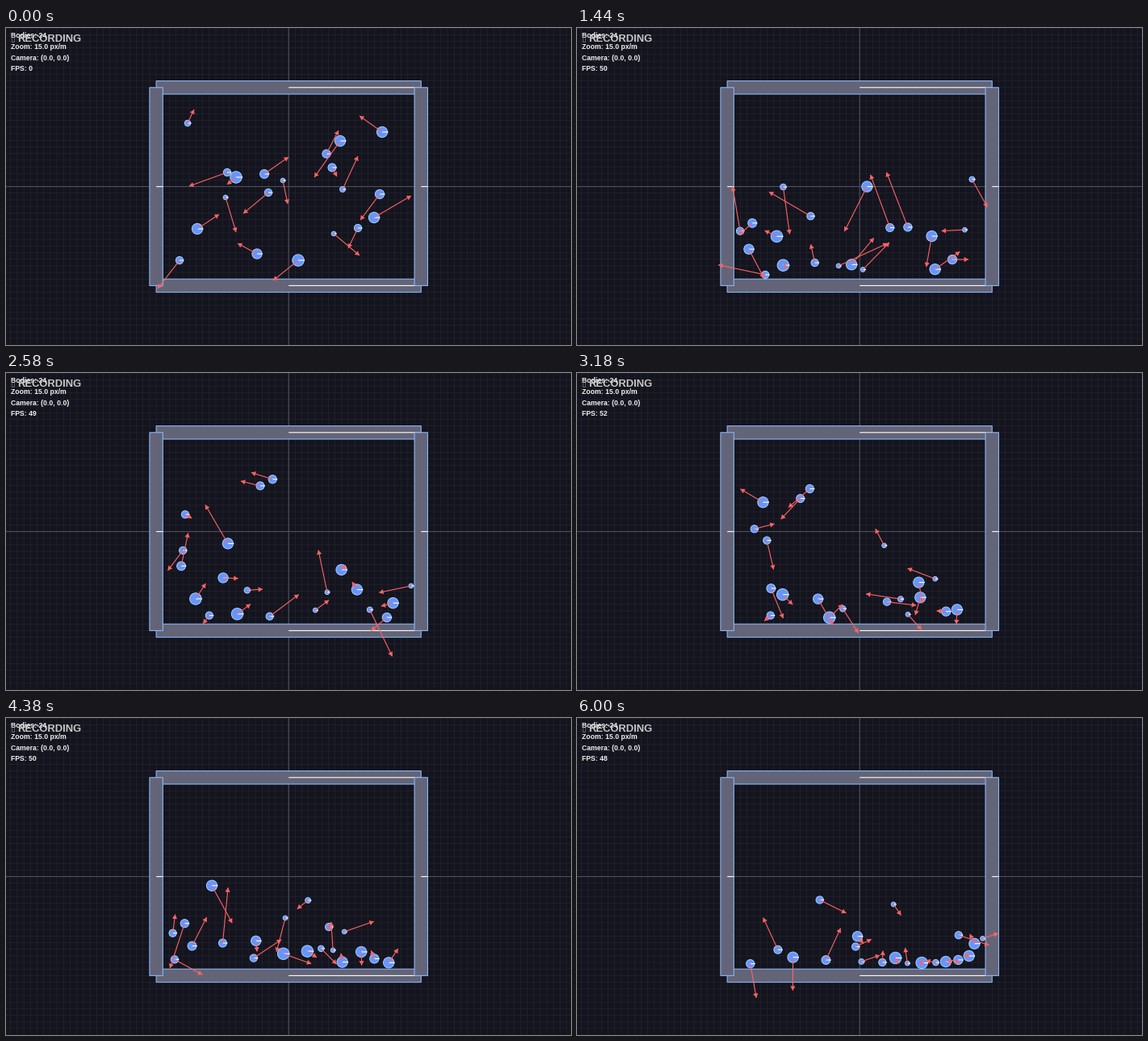
A matplotlib script for the animation above (6.06 s loop, 700x393 px).

```python
import math
import random

import matplotlib.pyplot as plt
import numpy as np
from matplotlib.animation import FuncAnimation
from matplotlib.collections import LineCollection, PolyCollection
from matplotlib.patches import Circle, Rectangle

W, H = 700, 393
FRAMES, STEP = 101, 60
CX, CY = 350.2, 196.6
MX, MY = 15 * W / 1280, 15 * H / 720   # one metre at 15 px/m, 1280 x 720 view
HALF_W, HALF_H = 20 * MX, 15 * MY
LOW = np.array([CX - HALF_W + MX, CY - HALF_H + MY])
HIGH = np.array([CX + HALF_W - MX, CY + HALF_H - MY])

GRAVITY = 138.7                # px / s^2
ARROW = 0.378                  # arrow length in px per px/s
WALL_BOUNCE, BALL_BOUNCE = 0.9, 0.8
SUBSTEPS = 12

BG, GRID, AXIS = "#14141e", "#28283200", "#50505f"
GRID = "#282833"
WALL, EDGE, BALL = "#646478", "#87b9f5", "#6496ff"
RIM, RED, WHITE = "#a5cdff", "#ff6464", "#ffffff"

# Start of each ball: centre, radius, velocity arrow.
START = np.array([
    (225, 118, 4.1, 8, -17), (466, 129, 7.0, -28, -20),
    (414, 140, 7.0, -32, 45), (397, 156, 5.5, 15, -29),
    (404, 173, 5.4, 6, 11), (274, 179, 5.0, -47, 17),
    (285, 185, 7.6, -11, 9), (320, 181, 5.8, 30, -21),
    (343, 189, 3.2, 6, 29), (325, 204, 5.0, -31, 26),
    (272, 210, 3.2, 13, 43), (417, 200, 3.8, 19, -41),
    (463, 206, 6.0, -24, 32), (456, 235, 7.0, 46, -27),
    (436, 248, 5.0, -12, 25), (406, 255, 3.2, 32, 27),
    (237, 249, 7.0, 27, -18), (215, 288, 5.0, -27, 35),
    (311, 280, 6.5, -24, -13), (362, 288, 7.6, -31, 25)])
RADII = START[:, 2]
MASS = RADII ** 2
PAIRS = np.triu_indices(len(RADII), 1)


def collide(p, v):
    i, j = PAIRS
    gap = p[j] - p[i]
    dist = np.hypot(gap[:, 0], gap[:, 1])
    depth = RADII[i] + RADII[j] - dist
    for n in np.nonzero(depth > 0)[0]:
        a, b = i[n], j[n]
        normal = gap[n] / max(dist[n], 1e-6)
        total = MASS[a] + MASS[b]
        p[a] -= normal * depth[n] * MASS[b] / total
        p[b] += normal * depth[n] * MASS[a] / total
        speed = (v[b] - v[a]) @ normal
        if speed < 0:
            kick = (1 + BALL_BOUNCE) * speed / total * normal
            v[a] += kick * MASS[b]
            v[b] -= kick * MASS[a]


def simulate():
    """Centres and velocities of all balls for every frame of the loop."""
    p, v = START[:, :2].copy(), START[:, 3:] / ARROW
    low, high = LOW + RADII[:, None], HIGH - RADII[:, None]
    dt = STEP / 1000 / SUBSTEPS
    track = []
    for _ in range(FRAMES):
        track.append((p.copy(), v.copy()))
        for _ in range(SUBSTEPS):
            p += v * dt
            p[:, 1] += GRAVITY * dt * dt / 2
            v[:, 1] += GRAVITY * dt
            collide(p, v)
            hit = ((p < low) & (v < 0)) | ((p > high) & (v > 0))
            v[hit] *= -WALL_BOUNCE
            p = np.clip(p, low, high)
    return track


track = simulate()
rng = random.Random(4)
fps = [0 if k < 3 else rng.randint(48, 53) for k in range(FRAMES)]


def px(n):
    return n * 0.72


fig = plt.figure(figsize=(W / 100, H / 100), dpi=100, facecolor=BG)
ax = fig.add_axes([0, 0, 1, 1])
ax.set_xlim(0, W)
ax.set_ylim(H, 0)
ax.axis("off")


def line(x0, y0, x1, y1, color, width, z):
    ax.plot([x0, x1], [y0, y1], color=color, lw=px(width), zorder=z,
            solid_capstyle="butt", snap=False)


def label(x, y, text, size, color, z):
    return ax.text(x, y, text, fontsize=px(size), color=color, zorder=z,
                   family="Liberation Sans", weight="bold", va="baseline")


for n in range(-43, 44):
    line(CX + n * MX, 0, CX + n * MX, H, GRID, 0.55, 1)
    if abs(n) < 25:
        line(0, CY + n * MY, W, CY + n * MY, GRID, 0.55, 1)
line(CX, 0, CX, H, AXIS, 1.1, 2)
line(0, CY, W, CY, AXIS, 1.1, 2)


def wall(x, y, half_w, half_h, z):
    ax.add_patch(Rectangle((x - half_w, y - half_h), 2 * half_w, 2 * half_h,
                           fc=WALL, ec=EDGE, lw=px(1.1), zorder=z,
                           snap=False))
    line(x, y, x + half_w, y, WHITE, 1.1, z + 0.1)


for side in (1, -1):
    wall(CX, CY + side * HALF_H, HALF_W, MY, 3)
    wall(CX + side * HALF_W, CY, MX, HALF_H, 4)

balls, marks = [], []
for n, r in enumerate(RADII):
    z = 5 + n * 0.02
    balls.append(ax.add_patch(Circle((0, 0), r - 0.4, fc=BALL, ec=RIM,
                                     lw=px(1), zorder=z)))
    marks += ax.plot([], [], color=WHITE, lw=px(1.1), zorder=z + 0.01,
                     solid_capstyle="butt", snap=False)

shafts = ax.add_collection(
    LineCollection([], colors=RED, linewidths=px(1.1), zorder=7))
heads = ax.add_collection(
    PolyCollection([], facecolors=RED, edgecolors="none", zorder=7))

for n, text in enumerate(["Bodies: 24", "Zoom: 15.0 px/m",
                          "Camera: (0.0, 0.0)", "FPS: 0"]):
    fps_text = label(6, 12.5 + n * 25 * H / 720, text, 8.7, "#f0f0f0", 8)
label(14.6, 16.6, "RECORDING", 13, "#c8c8c8", 9)
ax.add_patch(Rectangle((6.8, 8.5), 3.6, 8.2, fill=False, ec="#8c8c90",
                       lw=px(0.6), zorder=9))


def head(tip, angle, size=6.2, spread=math.pi / 6):
    return [tip] + [(tip[0] - size * math.cos(angle + d),
                     tip[1] - size * math.sin(angle + d))
                    for d in (-spread, spread)]


def draw(k):
    centres, speeds = track[k]
    tips = centres + speeds * ARROW
    for ball, mark, (x, y), r in zip(balls, marks, centres, RADII):
        ball.center = x, y
        mark.set_data([x, x + r + 0.5], [y, y])
    shafts.set_segments(list(np.stack([centres, tips], axis=1)))
    heads.set_verts([head(t, math.atan2(v[1], v[0]))
                     for t, v in zip(tips, speeds)])
    fps_text.set_text(f"FPS: {fps[k]}")
    return [*balls, *marks, shafts, heads, fps_text]


anim = FuncAnimation(fig, draw, frames=FRAMES, interval=STEP, repeat=True,
                     repeat_delay=0, init_func=lambda: draw(0))
plt.show()
```
